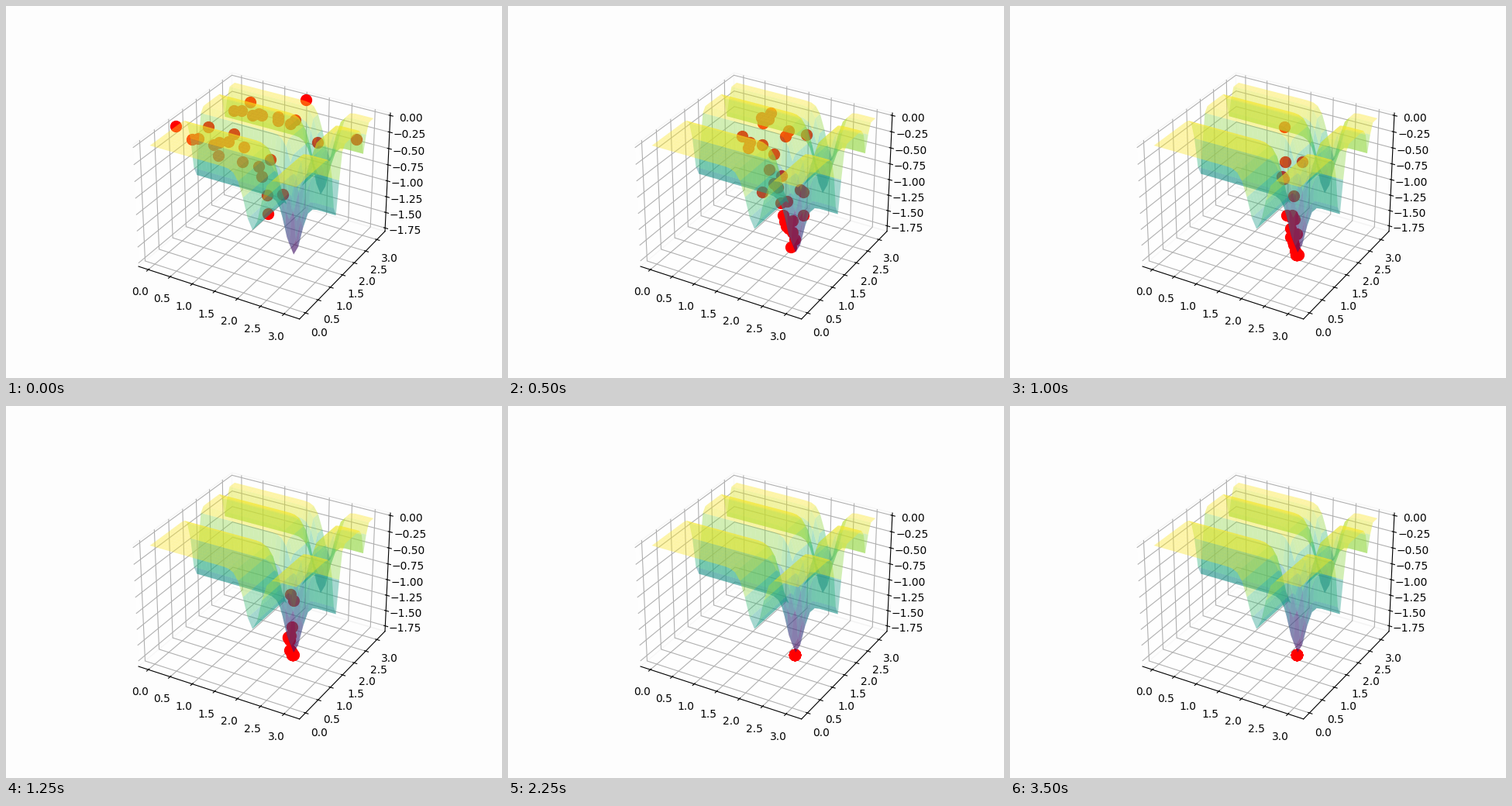
A matplotlib script that plays this animation: 640 by 480 pixels, repeating every 7500 ms.

```python
import numpy as np
import matplotlib.pyplot as plt
from matplotlib.animation import FuncAnimation

STEP, FRAMES, COUNT = 250, 30, 30
GOAL = np.array([2.203, 1.571])                  # lowest point of the surface
FAST = [(0, 0.9), (0.54, 0.61), (2.98, 2.63), (0.54, 1.21)]
SLOW = [(0.75, 2.09), (1.6, 3.14), (0.7, 2.51), (1.02, 2.04)]


def michalewicz(x, y, m=10):
    return (-np.sin(x) * np.sin(x**2 / np.pi)**(2 * m)
            - np.sin(y) * np.sin(2 * y**2 / np.pi)**(2 * m))


def padded(low, high, margin=0.0):
    pad = (high - low) * margin
    view = (high - low + 2 * pad) / 48
    return low - pad - view, high + pad + view


rng = np.random.default_rng(7)
crowd = rng.uniform((0.6, 0.3), (2.5, 2.4), (COUNT - len(FAST) - len(SLOW), 2))
start = np.vstack([FAST, crowd, SLOW])
settle = np.linspace(1.1, 3.6, COUNT)[:, None]   # steps each particle needs


def swarm(step):
    """Particles fall towards the goal, straying a little on the way."""
    pull = np.exp(-(step / settle)**2)
    stray = np.random.default_rng(step).normal(0, 0.3, start.shape)
    points = GOAL + (start - GOAL) * pull + stray * pull * (1 - pull)
    return np.clip(points, 0, np.pi).T


grid = np.arange(0, np.pi, 0.1)
X, Y = np.meshgrid(grid, grid)
Z = michalewicz(X, Y)

fig = plt.figure(figsize=(6.4, 4.8), dpi=100, facecolor="#fdfdfd")
ax = fig.add_subplot(projection="3d", facecolor="#fdfdfd")
ax.plot_surface(X, Y, Z, cmap="viridis", alpha=0.4)
dots, = ax.plot([], [], [], "ro", ms=10)
ax.set_xlim(padded(0, grid[-1], 0.05))
ax.set_ylim(padded(0, np.pi, 0.05))
for axis in (ax.xaxis, ax.yaxis, ax.zaxis):
    axis.pane.set_facecolor((1, 1, 1, 0))
    axis.pane.set_edgecolor("#f0f0f0")


def update(step):
    x, y = swarm(step)
    dots.set_data_3d(x, y, michalewicz(x, y))
    # The depth grows once the swarm has found the true minimum.
    lowest = Z.min() if step < 2 else michalewicz(*GOAL)
    ax.set_zlim(padded(lowest, 0))
    return dots,


anim = FuncAnimation(fig, update, frames=FRAMES, interval=STEP, repeat=True,
                     init_func=lambda: update(0))
plt.show()
```
